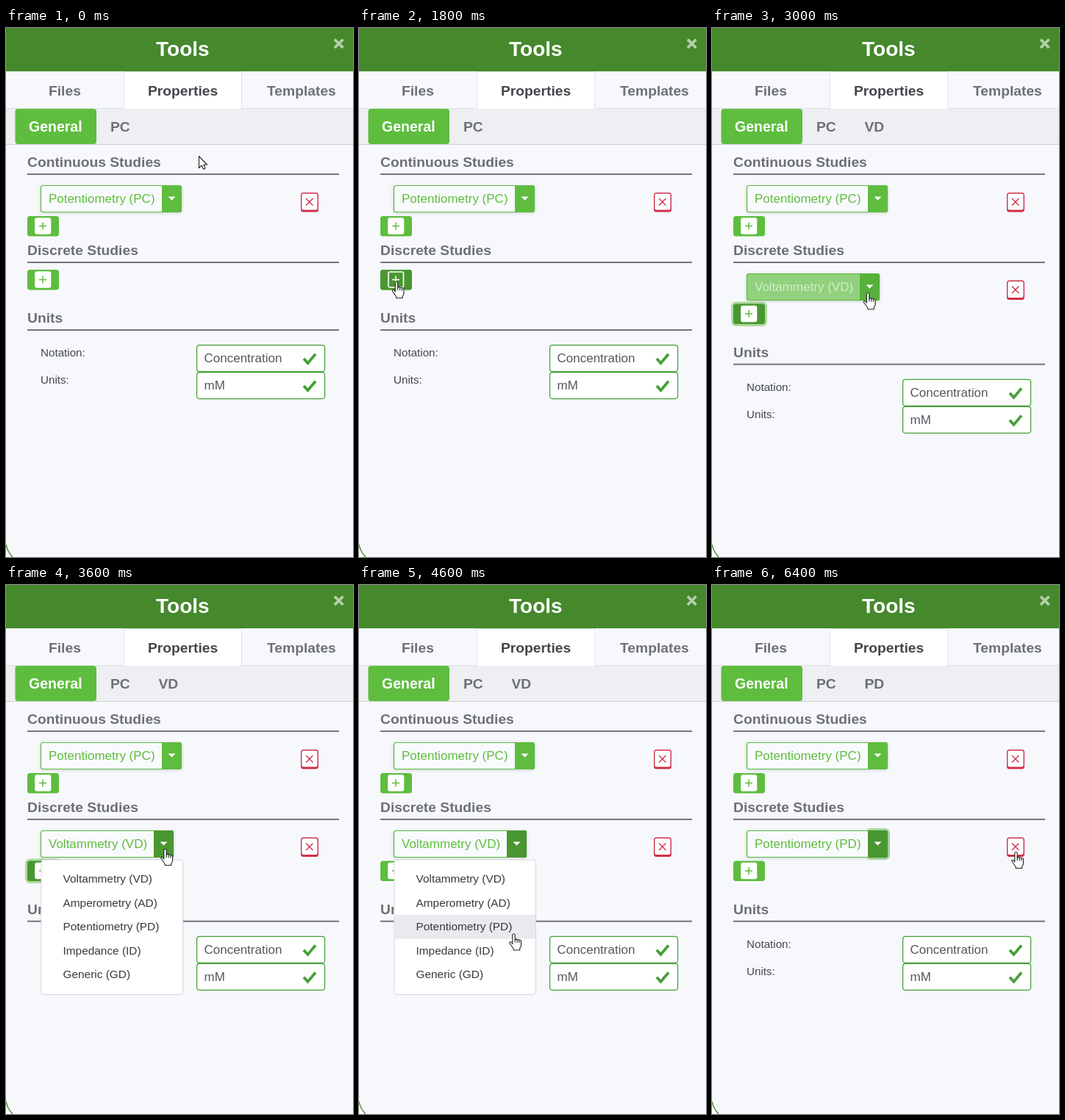
Write an HTML page that moves like this. It is 472x720 px and loops after 6700 ms.

```html
<!DOCTYPE html>
<html lang="en">
<head>
<meta charset="utf-8">
<title>Tools panel</title>
<style>
  html, body { margin: 0; width: 100%; height: 100%; overflow: hidden; background: #f6f8fc; }
  svg { display: block; width: 472px; height: 720px; font-family: "Liberation Sans", Arial, sans-serif; }
  .soft { filter: drop-shadow(0 1px 2px rgba(0, 0, 0, .16)); }
</style>
</head>
<body>
<svg id="stage" viewBox="0 0 472 720"></svg>
<script>
const LOOP = 6700, STEP = 100;
const GREEN = '#5ebd3e', DARK = '#4a9731', HEADER = '#45892c', RED = '#cf2f4a',
      PANEL = '#f6f8fc', GRAY = '#6d7075', INK = '#43464b', TICK = '#43a035';

const clamp = v => Math.max(0, Math.min(1, v));
const progress = (t, from, to) => clamp((t - from) / (to - from));
const smooth = u => u * u * (3 - 2 * u);
const mix = (a, b, u) => a + (b - a) * u;

const rect = (x, y, w, h, fill, extra = '') =>
  `<rect x="${x}" y="${y}" width="${w}" height="${h}" fill="${fill}" ${extra}/>`;
const line = (d, stroke, width, extra = '') =>
  `<path d="${d}" fill="none" stroke="${stroke}" stroke-width="${width}" ${extra}/>`;
const text = (x, y, size, fill, str, extra = '') =>
  `<text x="${x}" y="${y}" font-size="${size}" fill="${fill}" ${extra}>${str}</text>`;
const bold = (x, y, fill, str, size = 19.25) => text(x, y, size, fill, str, 'font-weight="700"');
const ring = (x, y, w, h, opacity) =>
  rect(x - 1.5, y - 1.5, w + 3, h + 3, 'none', `rx="5" stroke="#addb9f" stroke-width="3" opacity="${opacity}"`);

function section(y, title) {
  return bold(29, y, GRAY, title) + rect(29, y + 9, 424, 2, '#74767c');
}

function plusButton(y, dark = 0, hollow = 0, focus = 0) {
  const cross = `M45 ${y + 13.5}h10M50 ${y + 8.5}v10`;
  return ring(29, y, 43, 27.5, focus) +
    rect(29, y, 43, 27.5, GREEN, 'rx="3.5"') +
    rect(29, y, 43, 27.5, DARK, `rx="3.5" opacity="${dark}"`) +
    rect(40, y + 3, 20.5, 21, '#fff', `rx="2" stroke="#fff" stroke-width="1.6" fill-opacity="${1 - hollow}"`) +
    line(cross, GREEN, 1.5, `opacity="${1 - hollow}"`) +
    line(cross, '#fff', 1.5, `opacity="${hollow}"`);
}

// A split button: label part with fill amount `hover`, caret part with darkness `dark`.
function splitButton(y, width, label, hover = 0, dark = 0, focus = 0) {
  const caretX = 47 + width - 27, cx = caretX + 13.5;
  return ring(caretX, y, 27, 37, focus) +
    `<g class="soft">${rect(47.5, y + .5, width - 1, 36, '#f9fafd', `rx="3" stroke="${GREEN}" stroke-width="1.2"`)}</g>` +
    rect(47, y, width - 26, 37, GREEN, `rx="3" opacity="${hover}"`) +
    rect(caretX, y, 27, 37, GREEN, 'rx="3"') + rect(caretX, y, 5, 37, GREEN) +
    rect(caretX, y, 27, 37, DARK, `rx="2" opacity="${dark}"`) +
    text(58, y + 24, 17, GREEN, label, `opacity="${1 - hover}"`) +
    text(58, y + 24, 17, '#fff', label, `opacity="${hover}"`) +
    `<path d="M${cx - 5} ${y + 15.5}h10l-5 5z" fill="#fff"/>`;
}

function deleteButton(y) {
  return rect(401, y, 24, 26.5, RED, 'rx="3.5"') +
    rect(402.4, y + 1.4, 21.2, 22, '#fff', 'rx="2"') +
    line(`M408 ${y + 8}l9.5 9.5m0-9.5l-9.5 9.5`, RED, 1.4);
}

function field(y, value) {
  return rect(259.6, y + .6, 174, 36, '#fff', `rx="3.5" stroke="${TICK}" stroke-width="1.2"`) +
    text(269.5, y + 24, 17, '#54585e', value) +
    line(`M405 ${y + 19}l5.5 6.2 10.5-12.5`, TICK, 3.8);
}

function units(shift) {
  return `<g transform="translate(0 ${shift})">` + section(401, 'Units') +
    text(47, 447, 15.2, INK, 'Notation:') + text(47, 484, 15.2, INK, 'Units:') +
    field(431, 'Concentration') + field(468, 'mM') + '</g>';
}

const MENU = ['Voltammetry (VD)', 'Amperometry (AD)', 'Potentiometry (PD)', 'Impedance (ID)', 'Generic (GD)'];
const ROW_TOP = 383.7, ROW = 32.6;

function menu(pointerY, pressed) {
  const active = Math.floor((pointerY - ROW_TOP) / ROW);
  return rect(48, 374, 192.5, 183.5, '#fff', 'rx="4" stroke="#d5d7da"') +
    MENU.map((label, i) => {
      const y = ROW_TOP + i * ROW, down = pressed && i === active;
      return (i === active ? rect(48.5, y, 191.5, ROW, down ? GREEN : '#e9eaee') : '') +
        text(77.5, y + 21.3, 15.4, down ? '#fff' : '#36393e', label);
    }).join('');
}

const ARROW = 'M.5.5V16.5L4.2 13 6.7 18.2 9.2 17 6.8 12H11.5Z';
const HAND = 'M-1.7 14V1.6q1.7-2.6 3.4 0V8q1.6-1.4 3 .4 1.6-1 2.7.6 2.2-.6 2.6 1.2V16q0 2-1.8 4V22.5H-.3V20.5' +
             'Q-2.5 17.5-5.5 13.3q-.8-2.2 1.3-2 1.3.4 2.5 2.7Z';

function pointerAt(t) {
  if (t < 1800) {
    const u = smooth(progress(t, 0, 700));
    return [mix(262, 51, u), mix(174, 345, u)];
  }
  if (t < 2400) {
    const u = smooth(progress(t, 1800, 2400));
    return [mix(51, 137, u), mix(345, 359, u)];
  }
  if (t < 3900) {
    const u = smooth(progress(t, 2400, 3100));
    return [mix(137, 216.5, u), 359 + 7 * Math.sin(Math.PI * u)];
  }
  if (t < 5300) {
    const u = smooth(progress(t, 3900, 4600));
    return [mix(216.5, 210.5, u), mix(359, 474.5, u)];
  }
  const rest = 1 - progress(t, 5300, 6400);
  return [mix(413.5, 210.5, rest ** 2.3), mix(363, 474.5, rest ** 3)];
}

function pointer(t, [x, y]) {
  const hand = t >= 600 && t < 5300 || t >= 6100;
  return `<g transform="translate(${x} ${y})" stroke="#222" stroke-width="1.1" stroke-linejoin="round">` +
    `<path d="${hand ? HAND : ARROW}" fill="#fff"/>` +
    (hand ? '<path d="M1.7 8v4M4.7 8.6v3.6M7.4 9.4v3" fill="none"/>' : '') + '</g>';
}

function frame(added, discreteTab) {
  return rect(0, 0, 472, 720, PANEL) +
    `<path d="M0 703Q2 713 9 720H0Z" fill="#fff"/>` + line('M0 703Q2 713 9 720', HEADER, 1.3) +
    rect(0, 0, 472, 59, HEADER) + bold(204, 38, '#fff', 'Tools', 28) +
    line('M447 15.5l11.5 11.5m0-11.5l-11.5 11.5', '#b4d0aa', 3.8) +
    rect(0, 109, 472, 1, '#dcdfe3') + rect(160.5, 59.5, 160, 51, '#fff', 'stroke="#e2e4e8"') +
    bold(58, 92, GRAY, 'Files') + bold(193, 92, INK, 'Properties') + bold(355, 92, GRAY, 'Templates') +
    rect(0, 110, 472, 48, '#eeeff3') + rect(0, 158, 472, 1, '#cdcfd3') +
    rect(12.5, 110, 110.5, 48, GREEN, 'rx="4"') + bold(31, 141, '#fff', 'General', 19.5) +
    bold(142, 141, GRAY, 'PC') + (added ? bold(207.5, 141, GRAY, discreteTab) : '') +
    section(189, 'Continuous Studies') + splitButton(214, 192, 'Potentiometry (PC)') +
    deleteButton(224) + plusButton(256) + section(309, 'Discrete Studies');
}

function scene(t) {
  const added = t >= 1900, chosen = t >= 5300, open = t >= 3600 && !chosen;
  const at = pointerAt(t);
  let out = frame(added, chosen ? 'PD' : 'VD') + units(added ? 46.7 : 0);

  if (!added) {
    const hover = progress(t, 500, 1000);
    out += plusButton(329, hover, hover);
  } else {
    const focus = 1 - progress(t, 3600, 3800);
    const onCaret = progress(t, 2900, 3200);
    out += plusButton(375.5, focus, 0, focus) + deleteButton(343.5) + (chosen
      ? splitButton(334, 192, 'Potentiometry (PD)', 0, 1, progress(t, 5300, 5500))
      : splitButton(334, 181, 'Voltammetry (VD)', 1 - onCaret, onCaret));
  }
  if (open) out += menu(at[1], t === 5000);
  return out + pointer(t, at);
}

const stage = document.getElementById('stage');
const start = performance.now();
let shown = -1;

function tick() {
  const t = Math.floor((performance.now() - start) % LOOP / STEP) * STEP;
  if (t !== shown) stage.innerHTML = scene(shown = t);
  requestAnimationFrame(tick);
}
tick();
</script>
</body>
</html>
```
